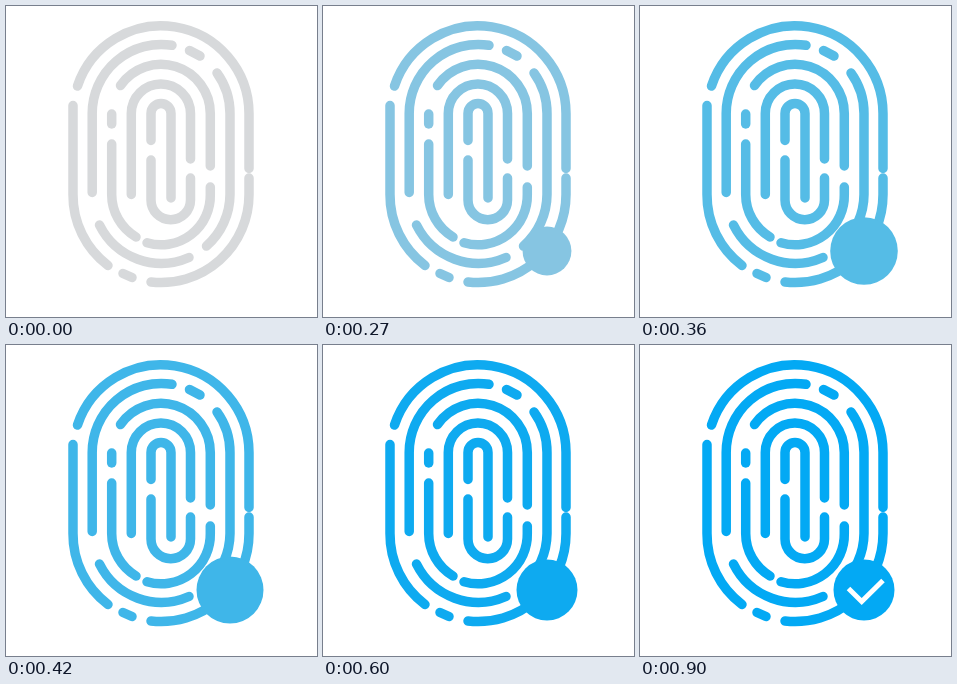
An HTML page that plays this animation: 311 by 311 pixels, repeating every 1.17 s.

```html
<!DOCTYPE html>
<html>
<head>
<meta charset="utf-8">
<style>
html, body { margin: 0; width: 100%; height: 100%; overflow: hidden; background: #fff; }
svg { display: block; width: 100%; height: 100%; }
</style>
</head>
<body>
<svg viewBox="0 0 311 311" fill="none">
  <g id="print" stroke-width="9.5" stroke-linecap="round">
    <!-- outer ring -->
    <path d="M71.5 80A88 88 0 0 1 243 107.5V162.5"/>
    <path d="M243 172V188.5A88 88 0 0 1 145 276"/>
    <path d="M126 271.5L117 267.5"/>
    <path d="M102 259.5A88 88 0 0 1 67 188.5V99.5"/>
    <!-- second ring -->
    <path d="M86.2 186.5V107.5A69 69 0 0 1 166 39.3"/>
    <path d="M183.5 44.5L194 50"/>
    <path d="M211 67A69 69 0 0 1 224 107.5V188.5A69 69 0 0 1 200.5 240"/>
    <path d="M183 251.5A69 69 0 0 1 93.5 219"/>
    <!-- third ring -->
    <path d="M114.5 79.5A49.3 49.3 0 0 1 204.3 107.5V160"/>
    <path d="M105.7 108V118"/>
    <path d="M105.7 138V188.5A49.3 49.3 0 0 0 130 231"/>
    <path d="M141 236.8A49.3 49.3 0 0 0 204.3 188.5V181"/>
    <!-- core -->
    <path d="M125.3 188.5V107.5A29.6 29.6 0 0 1 184.5 107.5V153"/>
    <path d="M145 134.5V107.5A10 10 0 0 1 165 107.5V192"/>
    <path d="M145 154V194A19.75 19.75 0 0 0 184.5 194V172"/>
  </g>
  <circle id="dot" cx="224" cy="245"/>
  <path id="tick" d="M208.5 243.5L221.7 256.5L243 235.5" stroke="#fff" stroke-width="5"
        pathLength="100" stroke-dasharray="0 200"/>
</svg>
<script>
const LOOP = 1170, STEP = 30;
const [print, dot, tick] = ['print', 'dot', 'tick'].map(id => document.getElementById(id));

// time, red, green, blue
const tints = [
  [30, 215, 217, 219], [150, 182, 211, 224], [270, 134, 197, 226], [360, 85, 188, 230],
  [480, 41, 176, 236], [600, 14, 170, 240], [720, 3, 169, 244]
];

const ease = (t, from, to) => {
  const p = Math.min(1, Math.max(0, (t - from) / (to - from)));
  return (1 - Math.cos(Math.PI * p)) / 2;
};

function tint(t) {
  const end = tints.length - 1;
  t = Math.min(tints[end][0], Math.max(tints[0][0], t));
  const i = Math.max(1, tints.findIndex(k => k[0] >= t));
  const a = tints[i - 1], b = tints[i];
  const p = (t - a[0]) / (b[0] - a[0]);
  return `rgb(${[1, 2, 3].map(c => Math.round(a[c] + (b[c] - a[c]) * p))})`;
}

function draw(now) {
  const t = Math.floor(now % LOOP / STEP) * STEP;
  const color = tint(t);
  print.setAttribute('stroke', color);
  dot.setAttribute('fill', color);
  // grow past the final size, then settle
  dot.setAttribute('r', 34.5 * ease(t, 60, 390) - 4 * ease(t, 390, 480));
  const drawn = ease(t, 600, 900);
  tick.style.display = drawn ? '' : 'none';
  tick.setAttribute('stroke-dasharray', `${100 * drawn} 200`);
}

const start = performance.now();
function loop() {
  draw(performance.now() - start);
  requestAnimationFrame(loop);
}
loop();
</script>
</body>
</html>
```
